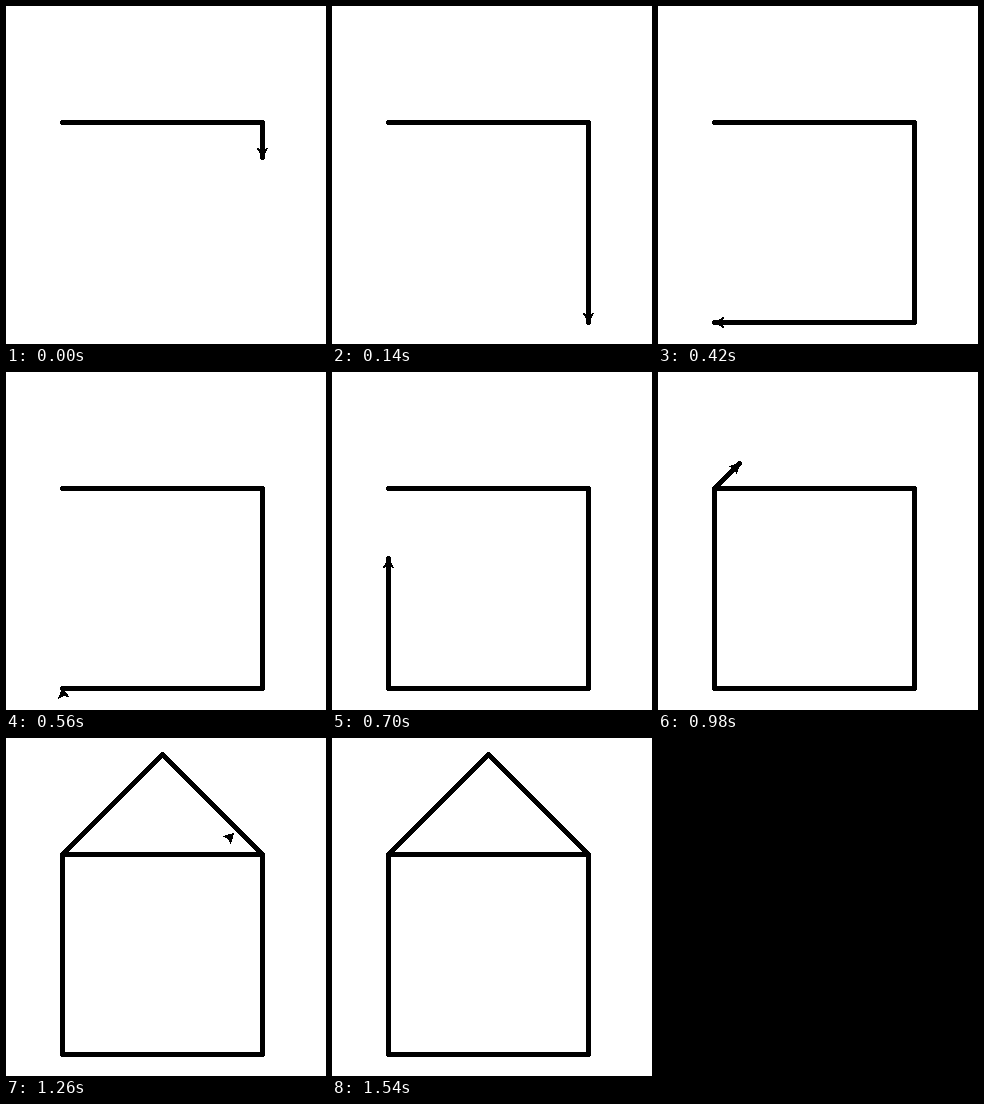
Write an HTML page that moves like this. It is 320 px wide and 338 px high and loops after 3.39 s.

```html
<!DOCTYPE html>
<html lang="en">
<head>
<meta charset="utf-8">
<title>Turtle house</title>
<style>
  html, body { margin: 0; height: 100%; overflow: hidden; background: #fff; }
  svg { display: block; }
</style>
</head>
<body>
<svg width="320" height="338" shape-rendering="crispEdges" stroke="#000" stroke-linecap="round" stroke-linejoin="round">
  <g transform="translate(.5 .5)">
    <polyline id="trail" fill="none" stroke-width="5"/>
    <polygon id="turtle"/>
  </g>
</svg>
<script>
const STEP = 140, LOOP = 3390, HIDE = 1540;
const WALL = 200, ROOF = WALL / Math.SQRT2;
const ARROW = [[0, 0], [-9, 5], [-7, 0], [-9, -5]];
const trail = document.getElementById('trail');
const turtle = document.getElementById('turtle');

// Turtle commands, each running until the given time in ms
const program = [
  { forward: WALL, until: -30 },
  { turn: 90, until: -30 },
  { forward: WALL, until: 140 },
  { turn: 90, until: 250 },
  { forward: WALL, until: 420 },
  { turn: 90, until: 567 },
  { forward: WALL, until: 772 },
  { turn: 45, until: 933 },
  { forward: ROOF, until: 1120 },
  { goTo: [256, 116], until: 1218 },
  { goTo: [33, -43], until: HIDE, penUp: true }
];

// Offset from the turtle's position, rotated and snapped to whole pixels
function place([x, y], [dx, dy], angle) {
  const cos = Math.cos(angle), sin = Math.sin(angle);
  return [Math.round(x + dx * cos - dy * sin), Math.round(y + dx * sin + dy * cos)];
}

function draw(time) {
  let position = [56, 116], angle = 0, start = -Infinity;
  const points = [position];

  for (const { forward, turn, goTo, until, penUp } of program) {
    if (time < start) break;
    const progress = time >= until ? 1 : (time - start) / (until - start);
    if (turn) {
      angle += turn * progress ** 2 * Math.PI / 180;
    } else {
      const [x, y] = position;
      const [endX, endY] = goTo || place(position, [forward, 0], angle);
      position = [x + (endX - x) * progress, y + (endY - y) * progress];
      if (!penUp) points.push(position.map(Math.round));
    }
    start = until;
  }

  trail.setAttribute('points', points.join(' '));
  turtle.setAttribute('points', ARROW.map(corner => place(position, corner, angle)).join(' '));
  turtle.style.display = time < HIDE ? '' : 'none';
}

function tick() {
  const time = performance.now() % LOOP;
  draw(Math.floor(time / STEP) * STEP);
  requestAnimationFrame(tick);
}
tick();
</script>
</body>
</html>
```
